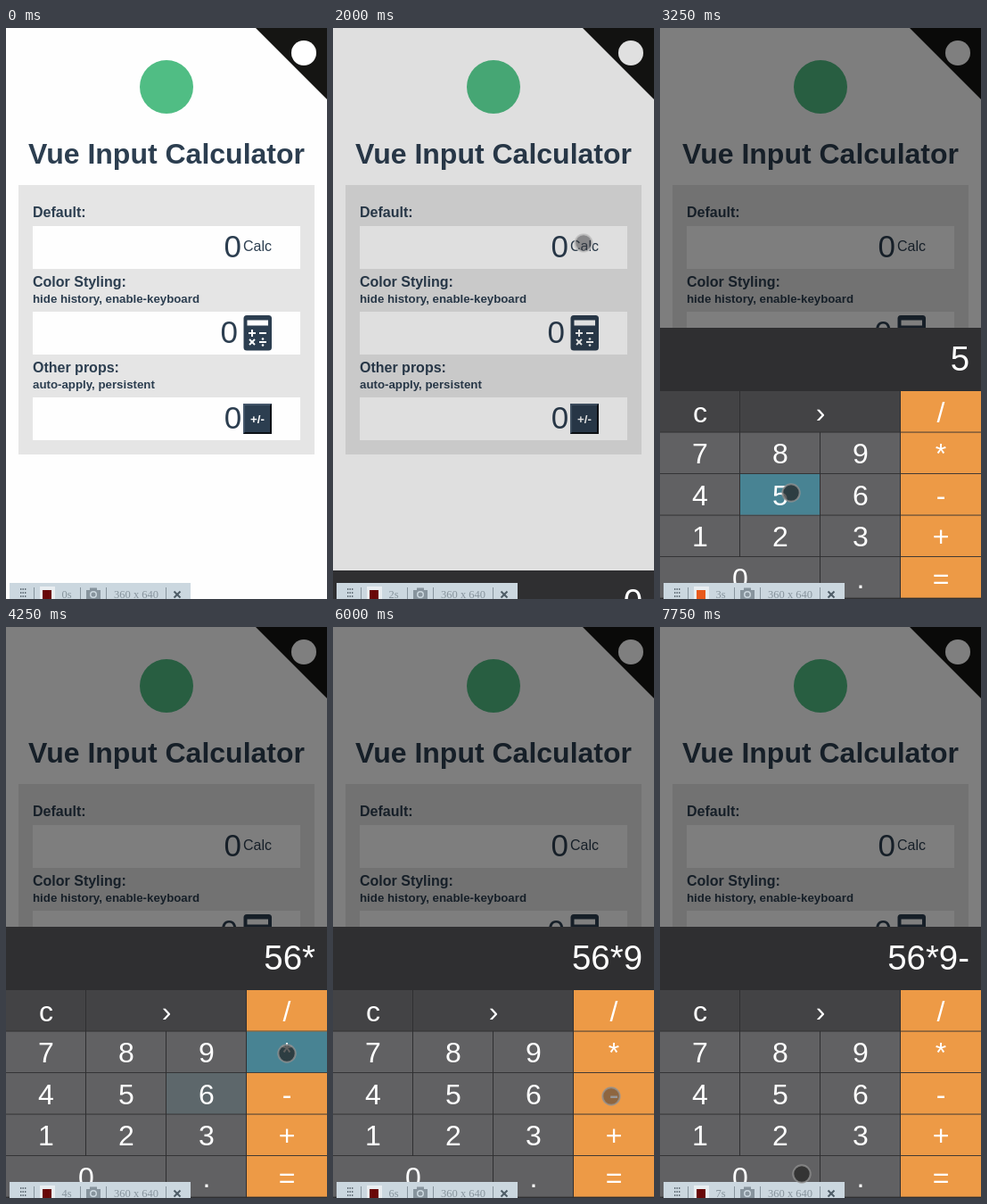
Animation of 360 by 640 pixels, one loop 8000 ms. Source, as an HTML page with a canvas:

```html
<!DOCTYPE html>
<html lang="en">
<head>
<meta charset="utf-8">
<title>Vue Input Calculator</title>
<style>
html, body { margin: 0; width: 100%; height: 100%; overflow: hidden; background: #fefefe; }
canvas { display: block; width: 360px; height: 640px; }
</style>
</head>
<body>
<canvas id="stage" width="360" height="640"></canvas>
<script>
const ctx = document.getElementById('stage').getContext('2d');
const SANS = '"Liberation Sans", Arial, sans-serif';
const SERIF = '"Liberation Serif", "Times New Roman", serif';
const NAVY = '#2c3e50';
const LOOP = 8000, STEP = 250;
const PANEL_TOP = 336;

// Pointer path: time, x, y
const path = [
  [1000, 318, 300], [1500, 281, 241], [2250, 281, 241], [3000, 147, 521],
  [3250, 147, 521], [3750, 226, 526], [4250, 315, 478], [4650, 228, 478],
  [5250, 291, 543], [5750, 312, 526], [6250, 312, 526], [6750, 272, 573],
  [7750, 159, 613]
];
const presses = [[3250, '5'], [3750, '6'], [4250, '*'], [4650, '9'], [6250, '-']];

// Keys: label, column, row, column span
const keys = [['c', 0, 0, 1], ['›', 1, 0, 2], ['0', 0, 4, 2], ['.', 2, 4, 1]];
['789', '456', '123'].forEach((row, r) =>
  [...row].forEach((label, c) => keys.push([label, c, r + 1, 1])));
[...'/*-+='].forEach((label, r) => keys.push([label, 3, r, 1]));

function rect(x, y, w, h, color) {
  ctx.fillStyle = color;
  ctx.fillRect(x, y, w, h);
}

function disc(x, y, r, color) {
  ctx.fillStyle = color;
  ctx.beginPath();
  ctx.arc(x, y, r, 0, Math.PI * 2);
  ctx.fill();
}

function polygon(color, ...points) {
  ctx.fillStyle = color;
  ctx.beginPath();
  points.forEach(p => ctx.lineTo(...p));
  ctx.fill();
}

function line(x1, y1, x2, y2, color, width) {
  ctx.strokeStyle = color;
  ctx.lineWidth = width;
  ctx.beginPath();
  ctx.moveTo(x1, y1);
  ctx.lineTo(x2, y2);
  ctx.stroke();
}

function text(str, x, y, size, color = NAVY, align = 'left', weight = 'normal', family = SANS) {
  ctx.font = `${weight} ${size}px ${family}`;
  ctx.textAlign = align;
  ctx.fillStyle = color;
  ctx.fillText(str, x, y);
}

function calculatorIcon() {
  ctx.fillStyle = NAVY;
  ctx.beginPath();
  ctx.roundRect(266.5, 322, 31.5, 39.5, 3.5);
  ctx.fill();
  rect(270.5, 327.5, 23.5, 6, '#fff');
  const stroke = (...p) => line(...p, '#fff', 2);
  stroke(272, 342, 280, 342);
  stroke(276, 338, 276, 346);
  stroke(284, 342, 292, 342);
  stroke(273, 349, 279, 355);
  stroke(279, 349, 273, 355);
  stroke(284, 352, 292, 352);
  disc(288, 348.5, 1.3, '#fff');
  disc(288, 355.5, 1.3, '#fff');
}

function applyButton() {
  rect(266, 421, 32, 34, '#44566a');
  polygon('#0c1116', [298, 421], [298, 455], [266, 455], [268, 453], [296, 453], [296, 423]);
  rect(268, 423, 28, 30, NAVY);
  text('+/-', 282, 443, 13.3, '#fff', 'center', 'bold');
}

function page() {
  rect(0, 0, 360, 640, '#fefefe');
  polygon('#151513', [280, 0], [360, 0], [360, 80]);
  disc(334, 28, 14, '#fff');
  disc(180, 66, 30, '#50bd84');
  text('Vue Input Calculator', 180, 152, 32, NAVY, 'center', 'bold');

  rect(14, 176, 332, 302, '#e5e5e5');
  const label = (str, y, size = 16) => text(str, 30, y, size, NAVY, 'left', 'bold');
  label('Default:', 212);
  label('Color Styling:', 290);
  label('hide history, enable-keyboard', 308, 13.28);
  label('Other props:', 386);
  label('auto-apply, persistent', 404, 13.28);

  [[222, 254.3], [318, 250.3], [414, 254.5]].forEach(([y, x]) => {
    rect(30, y, 300, 48, '#fefefe');
    text('0', x, y + 35, 35, NAVY, 'center');
  });
  text('Calc', 266, 250, 16);
  calculatorIcon();
  applyButton();
}

function panel(top, t) {
  rect(0, top, 360, 304, '#2f2f31');
  const entry = presses.filter(p => p[0] <= t).map(p => p[1]).join('') || '0';
  text(entry, 347, top + 48, 38.4, '#fff', 'right');

  for (const [label, col, row, span] of keys) {
    const x = col * 90, y = top + 71 + row * 46.5;
    const w = span * 90 - (col + span < 4 ? 1 : 0);
    rect(x, y, w, 45.6, col === 3 ? '#ed9a46' : row === 0 ? '#434345' : '#616163');
    const press = presses.find(p => p[1] === label);
    if (press && t >= press[0] && t < press[0] + 600) {
      ctx.globalAlpha = 1 - (t - press[0]) / 600;
      rect(x, y, w, 45.6, '#488393');
      ctx.globalAlpha = 1;
    }
    text(label, x + span * 45, y + 34.5, 32, '#fff', 'center');
  }
}

function recorderBar(t) {
  const ink = '#87949d';
  rect(4, 622, 203, 18, '#cbd7df');
  for (let i = 0; i < 9; i++) rect(16 + (i % 3) * 2.5, 628 + Math.floor(i / 3) * 4, 1.4, 2, '#66737c');
  [31.5, 83.5, 112.5, 179.5].forEach(x => line(x, 627, x, 640, ink, 1));

  const phase = (t / 875) % 1;
  const lit = t >= 1000 && phase > 0.5 && phase < 0.8;
  rect(38, 626, 17, 14, '#e9eef1');
  rect(41, 630, 10, 10, lit ? '#e85a1c' : '#690808');

  text(Math.floor(t / 1000) + 's', 68, 639, 12.5, ink, 'center', 'normal', SERIF);
  rect(90, 630, 16, 10, ink);
  rect(94, 627.5, 8, 3, ink);
  disc(98, 635, 4, '#cbd7df');
  disc(98, 635, 2.5, ink);
  text('360 x 640', 146, 639, 12.5, ink, 'center', 'normal', SERIF);
  line(188.5, 631.5, 195.5, 638.5, '#4d5c66', 2);
  line(195.5, 631.5, 188.5, 638.5, '#4d5c66', 2);
}

function pointer(t) {
  if (t < path[0][0]) return;
  let i = 0;
  while (i < path.length - 2 && t > path[i + 1][0]) i++;
  const [t0, x0, y0] = path[i], [t1, x1, y1] = path[i + 1];
  const p = Math.min(1, (t - t0) / (t1 - t0));
  const x = x0 + (x1 - x0) * p, y = y0 + (y1 - y0) * p;
  if (t < 2000) return disc(x, y, 9, 'rgba(45,35,35,.5)');

  const down = t >= 6750 || presses.some(([at]) => t >= at && t < at + STEP);
  disc(x, y, 10, down ? 'rgba(35,35,35,.72)' : 'rgba(55,55,60,.52)');
  ctx.strokeStyle = t < 2500 ? 'rgba(195,195,195,.85)' : 'rgba(150,150,150,.75)';
  ctx.lineWidth = 2;
  ctx.beginPath();
  ctx.arc(x, y, 9.7, 0, Math.PI * 2);
  ctx.stroke();
}

function draw(now) {
  const t = Math.floor((now % LOOP) / STEP) * STEP;
  page();
  if (t >= 2000) {
    rect(0, 0, 360, 640, `rgba(0,0,0,${t < 2250 ? 0.12 : 0.5})`);
    panel(t < 2250 ? 608 : t < 2500 ? PANEL_TOP + 18 : PANEL_TOP, t);
  }
  recorderBar(t);
  pointer(t);
}

const start = performance.now();
function tick() {
  draw(performance.now() - start);
  requestAnimationFrame(tick);
}
tick();
</script>
</body>
</html>
```
